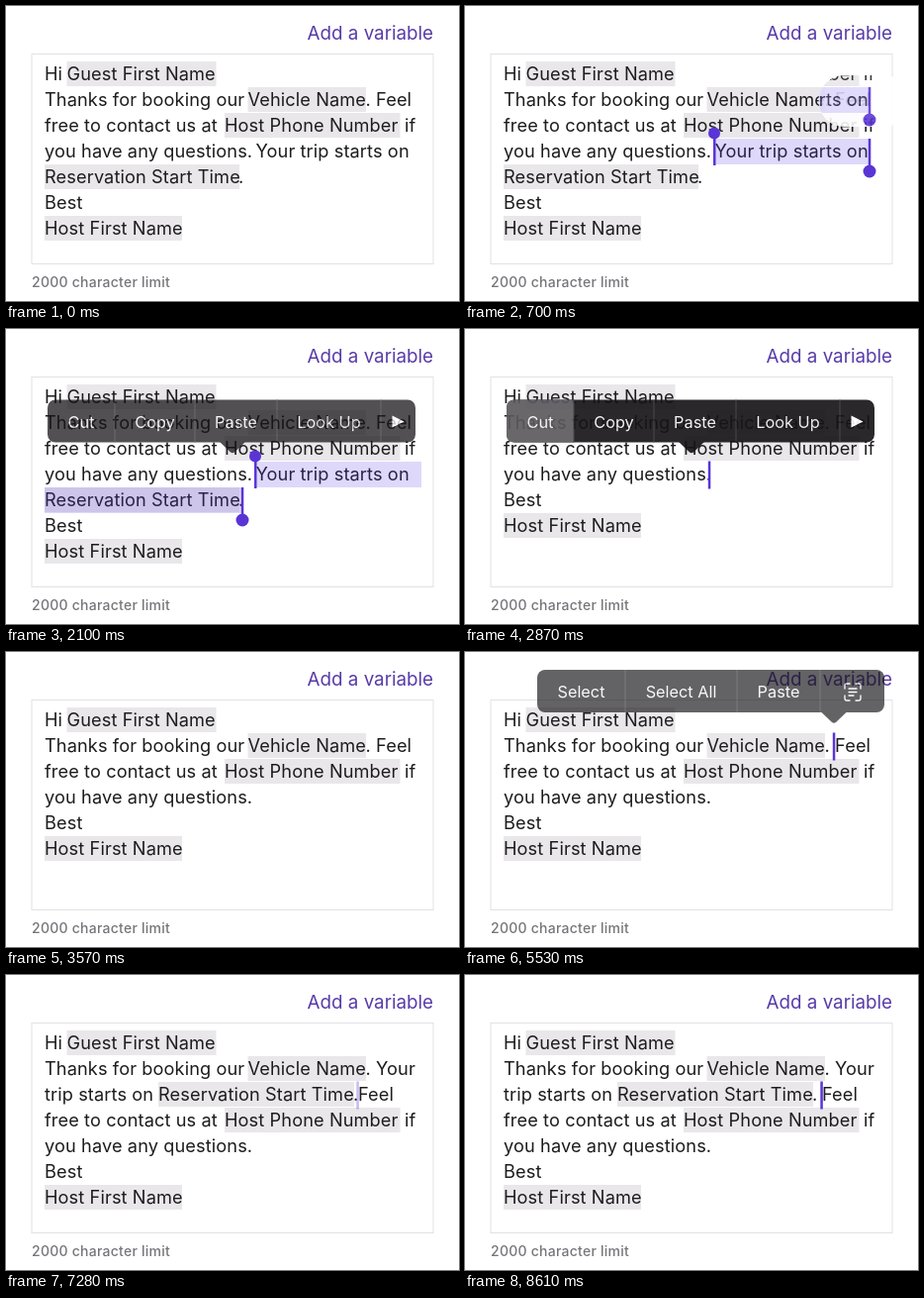
An HTML page that plays this animation: 458 px wide and 298 px high, repeating every 9.24 s.

```html
<!DOCTYPE html>
<html lang="en">
<head>
<meta charset="utf-8">
<title>Editing a message template</title>
<style>
  html, body { margin: 0; width: 100%; height: 100%; overflow: hidden; background: #fff; }
  svg { display: block; width: 458px; height: 298px; }
  text { font-family: Inter, sans-serif; font-optical-sizing: none; white-space: pre; }
  .message { font-size: 18.2px; letter-spacing: .1px; fill: #1d1c1e; }
  .chip { fill: #e9e7ea; }
  .link { font-size: 18.8px; fill: #583ba8; text-anchor: end; }
  .hint { font-size: 14px; font-weight: 500; letter-spacing: .25px; fill: #77757a; }
  .selected { fill: rgba(89, 60, 235, .2); }
  .accent { fill: #5935d6; }
  .menu text { font-size: 16.3px; fill: #f6f5f7; text-anchor: middle; }
  .menu .body { fill: #161417; }
  .menu .pressed { fill: #5b595d; }
  .menu .rule { fill: #3b393d; }
</style>
</head>
<body>
<svg viewBox="0 0 458 298">
  <defs>
    <clipPath id="lens"><rect id="lensShape" width="93" height="52" rx="26"/></clipPath>
  </defs>
  <rect width="458" height="298" fill="#fff"/>
  <rect x="26" y="48.5" width="406" height="212" fill="#fff" stroke="#e2e1e4"/>
  <text class="link" x="432" y="33.5">Add a variable</text>
  <text class="hint" x="26" y="284">2000 character limit</text>
  <g id="page">
    <g id="messages" class="message"></g>
    <g id="selection">
      <rect id="firstRow" class="selected" x="252" y="134" height="26"/>
      <rect id="secondRow" class="selected" x="39" y="160" width="200" height="26"/>
      <g class="accent">
        <rect x="251" y="134" width="2.5" height="27"/>
        <circle cx="252" cy="128.5" r="6"/>
        <g id="endHandle">
          <rect x="-1.2" width="2.5" height="28"/>
          <circle cy="33" r="6.5"/>
        </g>
      </g>
    </g>
  </g>
  <g id="loupe">
    <rect id="lensBack" width="93" height="52" rx="26" fill="#fff"/>
    <g clip-path="url(#lens)"><use href="#page" y="-52"/></g>
  </g>
  <rect id="caret" class="accent" width="2.5" height="28"/>
  <g id="menus"></g>
</svg>
<script>
const LOOP = 9240, STEP = 70;
const CUT = 2850, MOVE = 4060, PASTE = 6360, SPACE = 7490;
const LINE = 26, TOP = 56;
const $ = id => document.getElementById(id);
const set = (node, attrs) => Object.entries(attrs).forEach(([k, v]) => node.setAttribute(k, v));
const ramp = (t, from, to) => Math.min(1, Math.max(0, (t - from) / (to - from)));
const mix = (a, b, p) => a + (b - a) * p;

// A run is [x, text], or [x, text, right edge] for a variable chip.
const greeting = [[39, 'Hi'], [61.5, 'Guest First Name', 212.5]];
const thanks = next => [[39, 'Thanks for booking our'], [244.5, 'Vehicle Name', 364], [363.5, '. ' + next]];
const contact = [[39, 'free to contact us at'], [221, 'Host Phone Number', 398.5], [403, 'if']];
const questions = [[39, 'you have any questions.']];
const closing = [[[39, 'Best']], [[39, 'Host First Name', 178]]];
const pasted = feelX => [
  greeting, thanks('Your'),
  [[39, 'trip starts on'], [154, 'Reservation Start Time', 352], [351, '.'], [feelX, 'Feel']],
  contact, questions, ...closing
];
const versions = [
  [greeting, thanks('Feel'), contact, [...questions, [252.5, 'Your trip starts on']],
    [[39, 'Reservation Start Time', 236], [235, '.']], ...closing],
  [greeting, thanks('Feel'), contact, questions, ...closing],
  pasted(356),
  pasted(361)
];

const drawRun = ([x, text, right], row) => {
  const y = TOP + row * LINE;
  const chip = right ? `<rect class="chip" x="${x}" y="${y}" width="${right - x}" height="25"/>` : '';
  return `${chip}<text x="${x}" y="${y + 19.4}">${text}</text>`;
};
$('messages').innerHTML = versions.map(rows =>
  `<g>${rows.map((runs, row) => runs.map(run => drawRun(run, row)).join('')).join('')}</g>`).join('');

// Edges hold the left side, the dividers and the right side of a menu.
function drawMenu({ y, edges, labels, tip, pressed, icon }) {
  const left = edges[0], right = edges.at(-1), height = 43;
  const a = edges[pressed], b = edges[pressed + 1];
  const press = pressed === 0
    ? `M${b} ${y}H${a + 8}Q${a} ${y} ${a} ${y + 8}V${y + height - 8}Q${a} ${y + height} ${a + 8} ${y + height}H${b}Z`
    : `M${a} ${y}H${b}V${y + height}H${a}Z`;
  return `<g class="menu">
    <rect class="body" x="${left}" y="${y}" width="${right - left}" height="${height}" rx="8"/>
    <path class="body" d="M${tip - 13} ${y + height - .5}h26l-11 10.5q-2 1.6-4 0z"/>
    <path class="pressed" d="${press}"/>
    ${edges.slice(1, -1).map(x => `<rect class="rule" x="${x - .5}" y="${y}" width="1" height="${height}"/>`).join('')}
    ${labels.map((label, i) => `<text x="${(edges[i] + edges[i + 1]) / 2}" y="${y + 28}">${label}</text>`).join('')}
    ${icon}</g>`;
}
$('menus').innerHTML = drawMenu({
  y: 71.5, edges: [42, 110, 191, 274, 379, 414], labels: ['Cut', 'Copy', 'Paste', 'Look Up'], tip: 229, pressed: 0,
  icon: '<path fill="#fff" d="M390.5 87.5v12l12-6z"/>'
}) + drawMenu({
  y: 18, edges: [73, 162, 275, 359, 424], labels: ['Select', 'Select All', 'Paste'], tip: 373, pressed: 2,
  icon: `<path fill="none" stroke="#fff" stroke-width="1.3" stroke-linecap="round"
    d="M384 37v-3q0-2 2-2h3m6 0h3q2 0 2 2v3m0 7v3q0 2-2 2h-3m-6 0h-3q-2 0-2-2v-3M388 37h8m-8 3.5h8m-8 3.5h5"/>`
});

const blinks = [[3290, 3780], [4620, 5040], [5740, 6090], [7070, 7280], [8050, 8470]];

function drawCaret(t) {
  const [x, row] = t < MOVE ? [247, 3] : t < PASTE ? [373, 1] : t < SPACE ? [355.5, 2] : [360.5, 2];
  const fade = start => ramp(t, start - STEP, start + 2 * STEP);
  const opacity = blinks.reduce((sum, [off, on]) => sum - fade(off) + fade(on), 1);
  set($('caret'), { x: x - 1.2, y: TOP + row * LINE - .5, opacity: t < CUT ? 0 : opacity });
}

function drawSelection(t) {
  const second = t >= 1300;
  const dragged = mix(291, 409, ramp(t, 350, 700));
  set($('selection'), { opacity: t < CUT ? ramp(t, 0, 210) : 0 });
  set($('firstRow'), { width: (second ? 420 : dragged) - 252 });
  set($('secondRow'), { opacity: second ? 1 : 0 });
  set($('endHandle'), { transform: second ? 'translate(239 160)' : `translate(${dragged} 134)` });

  const glide = 1 - (1 - ramp(t, 1260, 1470)) ** 1.56;
  const lens = { x: mix(dragged - 5, 239, glide) - 46.5, y: second ? 96 : 70 };
  set($('lensShape'), lens);
  set($('lensBack'), lens);
  set($('loupe'), { opacity: .88 * (ramp(t, 280, 420) - ramp(t, 1820, 2030)) });
}

function drawMenus(t) {
  [[1900, 2170, CUT, 3080, 2520], [5390, 5600, PASTE, 6580, 6020]].forEach(([open, shown, close, gone, press], i) => {
    const menu = $('menus').children[i];
    set(menu, { opacity: ramp(t, open, shown) - ramp(t, close, gone) });
    set(menu.querySelector('.pressed'), { opacity: ramp(t, press, press + 210) });
  });
}

function frame() {
  const t = Math.floor(performance.now() % LOOP / STEP) * STEP;
  const version = [CUT, PASTE, SPACE].filter(time => t >= time).length;
  [...$('messages').children].forEach((group, i) => set(group, { display: i === version ? 'inline' : 'none' }));
  drawSelection(t);
  drawCaret(t);
  drawMenus(t);
  requestAnimationFrame(frame);
}
frame();
</script>
</body>
</html>
```
